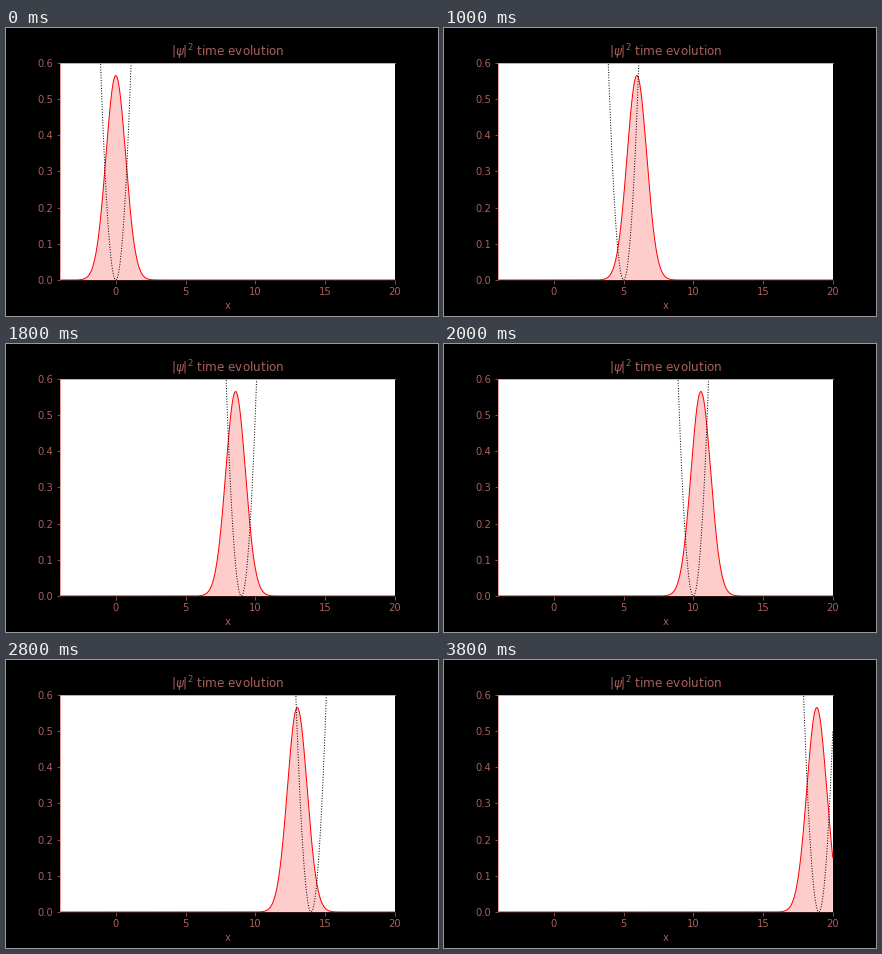
Animation, 432 px wide and 288 px high, one loop 4000 ms. Source, as a matplotlib script:

```python
import numpy as np
import matplotlib.pyplot as plt
from matplotlib.animation import FuncAnimation

FRAMES, INTERVAL = 20, 200
INK = "#a8605a"

plt.rcParams.update({"font.family": "DejaVu Sans", "font.size": 10})

fig, ax = plt.subplots(figsize=(6, 4), dpi=72, facecolor="black")
fig.subplots_adjust(left=0.125, right=0.9, bottom=0.125, top=0.88)
ax.set(xlim=(-4, 20), ylim=(0, 0.6))
ax.set_title(r"$|\psi|^2$ time evolution", fontsize=12, color=INK)
ax.set_xlabel("x", color=INK)
ax.tick_params(color=INK, labelcolor=INK)
for side, color in dict(left="#e08a84", top="#e08a84",
                        bottom="#3a1c1a", right="black").items():
    ax.spines[side].set_color(color)

x = np.linspace(-4, 20, 1000)
density, = ax.plot([], [], color="red", lw=1)
trap, = ax.plot([], [], color="black", ls=":", lw=1)
area = ax.fill_between(x, 0 * x, facecolor="red", alpha=0.2, lw=0)


def update(t):
    # Coherent state in a unit-frequency trap moving at unit speed from rest
    center = t - np.sin(t)
    rho = np.exp(-(x - center) ** 2) / np.sqrt(np.pi)
    density.set_data(x, rho)
    trap.set_data(x, (x - t) ** 2 / 2)
    outline = np.column_stack([x, rho])
    area.set_verts([np.vstack([[x[0], 0], outline, [x[-1], 0]])])
    return density, trap, area


anim = FuncAnimation(fig, update, frames=FRAMES, interval=INTERVAL,
                     repeat=True, repeat_delay=0)
plt.show()
```
